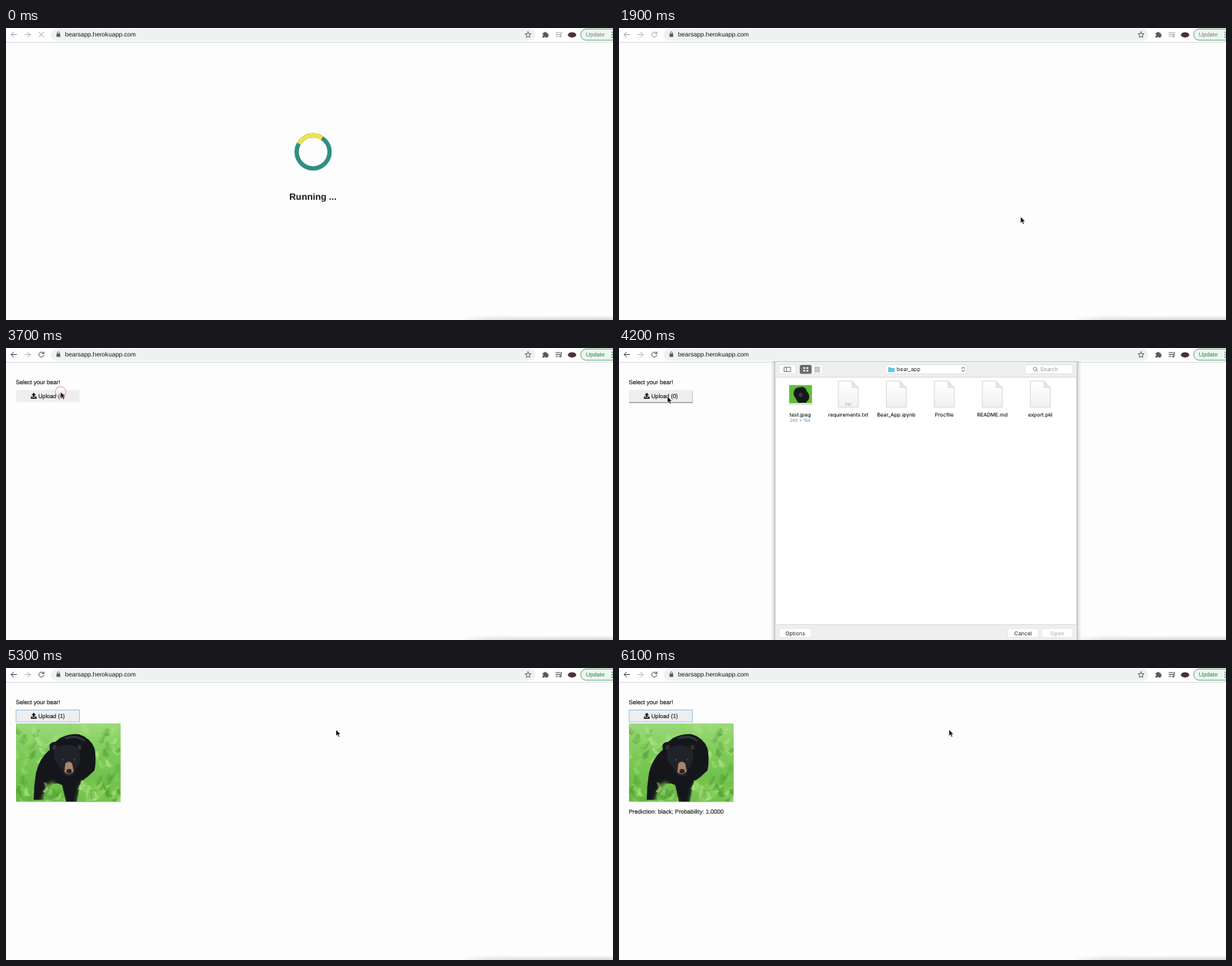
Write an HTML page that moves like this. It is 789 px wide and 379 px high and loops after 6.2 s.

```html
<!DOCTYPE html>
<html lang="en">
<head>
<meta charset="utf-8">
<title>Bear classifier</title>
<style>
html, body { margin: 0; width: 100%; height: 100%; overflow: hidden; background: #fdfdfd; }
svg { display: block; width: 100%; height: 100%; }
text { font-family: "Liberation Sans", Arial, sans-serif; font-size: 7.63px; fill: #1a1a1a; text-rendering: geometricPrecision; }
#content text, #result { stroke: #1a1a1a; stroke-width: .14; }
.line { fill: none; stroke-linecap: round; stroke-linejoin: round; }
.mac text { font-family: Inter, "Liberation Sans", sans-serif; font-size: 7px; fill: #222; }
.mac .label { font-size: 6.6px; font-weight: 500; text-anchor: middle; fill: #111; }
.mac .btn { fill: #fff; stroke: #d9d9d9; stroke-width: .6; }
.tone { color: #a3a6a9; }
.live .tone { color: #4a4d51; }
#update { fill: #75807a; }
.live #update { fill: #23804a; }
</style>
</head>
<body>
<svg viewBox="0 0 789 379" preserveAspectRatio="none">
  <defs>
    <filter id="blur" x="-20%" y="-20%" width="140%" height="140%"><feGaussianBlur stdDeviation="3"/></filter>
    <filter id="soft"><feGaussianBlur stdDeviation=".7"/></filter>
    <filter id="haze"><feGaussianBlur stdDeviation="2.5"/></filter>
    <linearGradient id="dockFade">
      <stop offset="0" stop-color="#777" stop-opacity="0"/><stop offset=".2" stop-color="#777" stop-opacity=".22"/>
      <stop offset="1" stop-color="#777" stop-opacity=".3"/>
    </linearGradient>
    <linearGradient id="dockDrop" x2="0" y2="1">
      <stop offset="0" stop-color="#fff" stop-opacity="0"/><stop offset="1" stop-color="#fff"/>
    </linearGradient>
    <mask id="dockMask"><rect x="590" y="373" width="199" height="6" fill="url(#dockDrop)"/></mask>
    <linearGradient id="meadow" x2="0" y2="1">
      <stop offset="0" stop-color="#9bd97a"/><stop offset=".4" stop-color="#7cc958"/><stop offset="1" stop-color="#68b845"/>
    </linearGradient>
    <linearGradient id="paper" x2="0" y2="1">
      <stop offset="0" stop-color="#fff"/><stop offset="1" stop-color="#f1f1f1"/>
    </linearGradient>
    <clipPath id="page"><rect y="17" width="789" height="362"/></clipPath>
    <clipPath id="photoBox"><rect x="13" y="72" width="136" height="101.5"/></clipPath>
  </defs>

  <rect width="789" height="379" fill="#fdfdfd"/>

  <g id="content">
    <text x="12.7" y="47.4">Select your bear!</text>
    <rect id="lift" x="13" y="55.5" width="83" height="16" fill="#000" opacity=".35" filter="url(#soft)"/>
    <rect id="button" x="13" y="54.5" width="82.5" height="15.5" fill="#eee" stroke-width=".9"/>
    <path d="M36.1 57.9l3 3.3h-1.8v2.6h-2.4v-2.6h-1.8zM32.5 62.9h1.8v1.5h3.6v-1.5h1.8v3.1h-7.2z" fill="#1a1a1a"/>
    <text id="upload" x="42" y="64.9" style="font-size:7.4px">Upload (0)</text>
  </g>

  <g id="photo" clip-path="url(#photoBox)">
    <rect x="13" y="72" width="136" height="102" fill="url(#meadow)"/>
    <g id="backFern"></g>
    <g filter="url(#soft)">
      <path d="M57 99Q65 96 70 91Q82 85 95 86Q110 91 115 104Q118 119 115 133Q106 142 97 148L92 174H78L73 152Q62 146 56 156L50 171H36Q36 154 39 136Q44 116 57 106Z" fill="#14161a"/>
      <path d="M78 91Q92 87 101 94" class="line" stroke="#30343b" stroke-width="3"/>
    </g>
    <ellipse cx="62.5" cy="102" rx="6" ry="6" fill="#15171b"/>
    <ellipse cx="96" cy="102" rx="5" ry="5.8" fill="#15171b"/>
    <ellipse cx="63" cy="103" rx="2.8" ry="3.2" fill="#332f31"/>
    <ellipse cx="95.5" cy="103" rx="2.4" ry="3.2" fill="#332f31"/>
    <path d="M62 108Q69 99 80 100Q91 99 96 109Q98 122 91 130L88 139Q82 143 76 139L71 130Q61 121 62 108Z" fill="#202329"/>
    <g filter="url(#soft)">
      <path d="M77 124Q82 119 86 124L88 134Q82 141 76 135Z" fill="#a98569"/>
      <ellipse cx="82" cy="134" rx="3.5" ry="3" fill="#29252a"/>
    </g>
    <circle cx="74" cy="119" r=".9" fill="#6b4a35"/><circle cx="89" cy="119" r=".9" fill="#6b4a35"/>
    <path d="M46 174Q53 151 60 148Q70 153 76 174ZM92 174L97 152Q112 140 122 142L152 150V176Z" fill="#74c34c" filter="url(#haze)"/>
    <g id="frontFern"></g>
  </g>
  <text id="result" x="12.7" y="188.6">Prediction: black; Probability: 1.0000</text>

  <g id="loading">
    <circle cx="399.2" cy="160.8" r="21.4" fill="none" stroke="#2f8e82" stroke-width="5.6"/>
    <circle id="arc" cx="399.2" cy="160.8" r="21.4" fill="none" stroke="#f0e14d" stroke-width="5.6" pathLength="360" stroke-dasharray="93 267"/>
    <text x="399" y="223" text-anchor="middle" style="font-size:11.9px;font-weight:700">Running ...</text>
  </g>

  <rect x="590" y="373" width="199" height="6" fill="url(#dockFade)" mask="url(#dockMask)"/>

  <g id="bar">
    <rect width="789" height="18" fill="#fefefe"/>
    <path d="M0 18.5H789" stroke="#dcdddf"/>
    <rect x="58" y="1" width="630" height="15.5" rx="7.75" fill="#eff2f3"/>
    <g class="tone line" stroke="currentColor" stroke-width="1">
      <path d="M13.8 8.5H6.8M10 5.2L6.7 8.5L10 11.8"/>
      <path id="stop" d="M42.8 5.4l6.2 6.2M49 5.4l-6.2 6.2"/>
      <path id="reload" d="M48.7 6.7A3.3 3.3 0 1 0 49.2 9.3M49.2 5v2.3h-2.4"/>
      <path d="M714.5 6h6M714.5 8.5h6M714.5 11h3.4M721.4 10.8V6h1.5" stroke-linecap="butt"/>
      <circle cx="720.3" cy="11" r=".9"/>
    </g>
    <path d="M24.4 8.5h7M28.2 5.2l3.3 3.3l-3.3 3.3" class="line" stroke="#b3b5b8"/>
    <rect x="65.7" y="7.3" width="4.8" height="4.3" rx=".6" fill="#55585c"/>
    <path d="M66.7 7.4V6.4a1.4 1.4 0 0 1 2.8 0v1" class="line" stroke="#55585c" stroke-width=".8"/>
    <text x="76.8" y="11.2" style="font-size:8.12px">bearsapp.herokuapp.com</text>
    <path id="star" class="line" stroke="#55585c" stroke-width=".9"/>
    <path d="M697.4 6.2h2.1a1.3 1.3 0 1 1 2.6 0h2.1v2.1a1.3 1.3 0 1 1 0 2.6v1.6h-2.3a1.1 1.1 0 0 0-2.2 0h-2.3v-2.3a1.1 1.1 0 0 0 0-2.2z" fill="#55585c"/>
    <ellipse cx="735.8" cy="8.9" rx="5.5" ry="3.5" fill="#4a3239"/>
    <rect x="747" y="1.3" width="60" height="14.6" rx="7.3" fill="#eef5f0" stroke="#5fae7b"/>
    <text id="update" x="753.7" y="11.2" style="font-size:7.6px">Update</text>
    <path d="M788 5.5v.01M788 8.7v.01M788 11.9v.01" class="line" stroke="#2c7c4b" stroke-width="1.7"/>
  </g>

  <g clip-path="url(#page)">
    <g id="sheet" class="mac">
      <rect x="203" y="10" width="392" height="371" fill="#000" opacity=".45" filter="url(#blur)"/>
      <rect x="203" y="10" width="392" height="370" fill="#fff" stroke="#b9b9b9" stroke-width=".8"/>
      <path d="M203.4 10h391.2v28H203.4zM203.4 359h391.2v20.6H203.4z" fill="#efefef"/>
      <path d="M203.4 38h391.2M203.4 359h391.2" stroke="#d2d2d2" stroke-width=".8"/>
      <path d="M203 17.4h392" stroke="#bbb" stroke-width=".8"/>
      <rect class="btn" x="208" y="22" width="22" height="11.5" rx="2"/>
      <path d="M215 25h8v5.6h-8zM217.7 25v5.6" class="line" stroke="#555" stroke-width=".8"/>
      <rect class="btn" x="235" y="22" width="30" height="11.5" rx="2"/>
      <rect x="235" y="22" width="15.5" height="11.5" rx="2" fill="#6b6b6b"/>
      <path d="M239.5 26h2.5M243.5 26h2.5M239.5 29.5h2.5M243.5 29.5h2.5" stroke="#fff" stroke-width="2"/>
      <path d="M254 25h7.5M254 27h7.5M254 29h7.5M254 31h7.5" stroke="#666" stroke-width=".7"/>
      <rect class="btn" x="346" y="22" width="106" height="11.5" rx="2"/>
      <path d="M349.8 25h3.2l.8 1h4.4v5.2h-8.4z" fill="#61c4ee"/>
      <text x="361" y="30.2">bear_app</text>
      <path d="M445.8 26.6l1.7-1.8l1.7 1.8M445.8 28.8l1.7 1.8l1.7-1.8" class="line" stroke="#444" stroke-width=".9"/>
      <rect class="btn" x="528" y="22" width="62" height="11.5" rx="2"/>
      <path d="M542.5 29l2 2M543.1 27.3a2.3 2.3 0 1 1-4.6 0a2.3 2.3 0 1 1 4.6 0" class="line" stroke="#777" stroke-width=".8"/>
      <text x="547.5" y="30.2" style="fill:#999">Search</text>
      <g id="files"></g>
      <rect x="220" y="47.5" width="32" height="26" fill="#000" opacity=".35" filter="url(#soft)"/>
      <rect x="220" y="47" width="32" height="26" fill="#fff"/>
      <rect x="221.2" y="48.2" width="29.6" height="23.6" fill="#5fbd36"/>
      <path d="M227 61Q226 52 234 51Q242 49 244 56Q248 60 247 66L243 71H233Z" fill="#15181a"/>
      <ellipse cx="236" cy="61" rx="2.5" ry="3" fill="#343a3e"/>
      <text class="label" x="235.5" y="96.4" style="font-size:5.7px;font-weight:400;fill:#5594d6">260 × 194</text>
      <text x="298" y="74.5" text-anchor="middle" style="font-size:4.6px;fill:#888">TXT</text>
      <g id="buttons"></g>
    </g>
  </g>

  <circle id="ring" r="6.8" fill="#fff" fill-opacity=".3" stroke="#ee8f99" stroke-width="1.2"/>
  <path id="cursor" d="M0 0V8.2L1.9 6.5L3.2 9.5L4.6 8.9L3.3 6H5.8Z" fill="#000" stroke="#fff" stroke-width=".5" stroke-linejoin="round"/>
</svg>
<script>
const LOOP = 6200, STEP = 100;
const $ = id => document.getElementById(id);
const show = (id, on) => $(id).setAttribute('display', on ? 'inline' : 'none');
const within = (t, from, to) => t >= from && t < to;

// Time, x, y
const cursorPath = [
  [1200, 522, 245], [2700, 522, 245], [3400, 72, 57], [3700, 71, 57], [4200, 63, 63],
  [4300, 63, 63], [4500, 237, 60], [4700, 248, 60], [4800, 248, 60], [5200, 429, 80]
];
// Time, vertical offset
const sheetPath = [[3700, -380], [3800, -330], [3900, -110], [4000, 0], [4500, 0], [4600, -190], [4700, -358], [4800, -390]];
// Start, end, x, y, opacity
const clicks = [[3500, 3800, 71, 57, .75], [4500, 4800, 237.8, 61, 1]];

function sample(path, t, ease = k => k) {
  if (t <= path[0][0]) return path[0].slice(1);
  const i = path.findIndex(p => p[0] > t);
  if (i < 0) return path[path.length - 1].slice(1);
  const a = path[i - 1], b = path[i], k = ease((t - a[0]) / (b[0] - a[0]));
  return a.slice(1).map((v, n) => v + (b[n + 1] - v) * k);
}
const smooth = k => k * k * (3 - 2 * k);

function drawStar() {
  const points = Array.from({ length: 10 }, (_, i) => {
    const a = -Math.PI / 2 + i * Math.PI / 5, r = i % 2 ? 1.8 : 4.1;
    return `${678.6 + r * Math.cos(a)} ${8.9 + r * Math.sin(a)}`;
  });
  $('star').setAttribute('d', `M${points.join('L')}Z`);
}

function drawFiles() {
  const names = ['test.jpeg', 'requirements.txt', 'Bear_App.ipynb', 'Procfile', 'README.md', 'export.pkl'];
  $('files').innerHTML = names.map((name, i) => {
    const x = 235.6 + i * 62.4;
    const sheet = i ? `<path d="M${x - 13} 43h18l8 8.5v25.5h-26z" fill="url(#paper)" stroke="#d0d0d0" stroke-width=".8"/>
      <path d="M${x + 5} 43v8.5h8z" fill="#e6e6e6" stroke="#d0d0d0" stroke-width=".6"/>` : '';
    return `${sheet}<text class="label" x="${x}" y="88.5">${name}</text>`;
  }).join('');
  const buttons = [['Options', 208, 42, '#222'], ['Cancel', 505, 40.5, '#222'], ['Open', 549.5, 40.5, '#aaa']];
  $('buttons').innerHTML = buttons.map(([name, x, w, color]) =>
    `<rect class="btn" x="${x}" y="364" width="${w}" height="11.8" rx="2.2"/>
     <text x="${x + w / 2}" y="372.5" text-anchor="middle" style="fill:${color}">${name}</text>`).join('');
}

function drawFerns() {
  let seed = 11;
  const rand = () => (seed = seed * 16807 % 2147483647) / 2147483647;
  const colors = ['#b5e78c', '#4f9f35', '#8fd763', '#a4e078', '#5fae40'];
  function frond(x, y, size, lean) {
    let d = `M${x} ${y}l${lean * size} ${-size}`;
    for (let k = .1; k < 1; k += .15) {
      const px = x + lean * size * k, py = y - size * k, leaf = size * .42 * (1 - k * .7);
      d += `M${px - leaf} ${py - leaf * .4}L${px} ${py}L${px + leaf} ${py - leaf * .4}`;
    }
    const color = colors[Math.floor(rand() * colors.length)];
    return `<path class="line" d="${d}" stroke="${color}" stroke-width="${.5 + rand() * .6}" opacity=".8"/>`;
  }
  const patch = (count, x, w, y, h) => Array.from({ length: count }, () =>
    frond(x + rand() * w, y + rand() * h, 6 + rand() * 8, rand() * 1.6 - .8)).join('');
  $('backFern').innerHTML = patch(110, 10, 142, 82, 98);
  $('frontFern').innerHTML = patch(36, 94, 56, 150, 28) + patch(14, 50, 22, 160, 18) + patch(6, 10, 24, 164, 14);
}

function render(t) {
  show('loading', t < 1000);
  $('arc').setAttribute('transform', `rotate(${-150 + t * .36} 399.2 160.8)`);
  show('stop', t < 1000);
  show('reload', t >= 1000);
  $('bar').classList.toggle('live', within(t, 3500, 4600) || t >= 4900);

  const done = t >= 5000;
  show('content', t >= 2700);
  show('lift', within(t, 3900, 4400));
  $('upload').textContent = `Upload (${done ? 1 : 0})`;
  $('button').setAttribute('stroke', done ? '#8fc1e8' : 'none');
  show('photo', t >= 5100);
  show('result', t >= 5700);

  show('sheet', within(t, 3800, 4800));
  $('sheet').setAttribute('transform', `translate(0 ${sample(sheetPath, t)[0]})`);

  const click = clicks.find(c => within(t, c[0], c[1]));
  show('ring', click);
  if (click) {
    $('ring').setAttribute('transform', `translate(${click[2]} ${click[3]})`);
    $('ring').setAttribute('opacity', click[4]);
  }
  show('cursor', t >= 1200);
  $('cursor').setAttribute('transform', `translate(${sample(cursorPath, t, smooth).join(' ')})`);
}

drawStar();
drawFiles();
drawFerns();
const start = performance.now();
function tick() {
  const t = (performance.now() - start) % LOOP;
  render(Math.floor(t / STEP) * STEP);
  requestAnimationFrame(tick);
}
tick();
</script>
</body>
</html>
```
